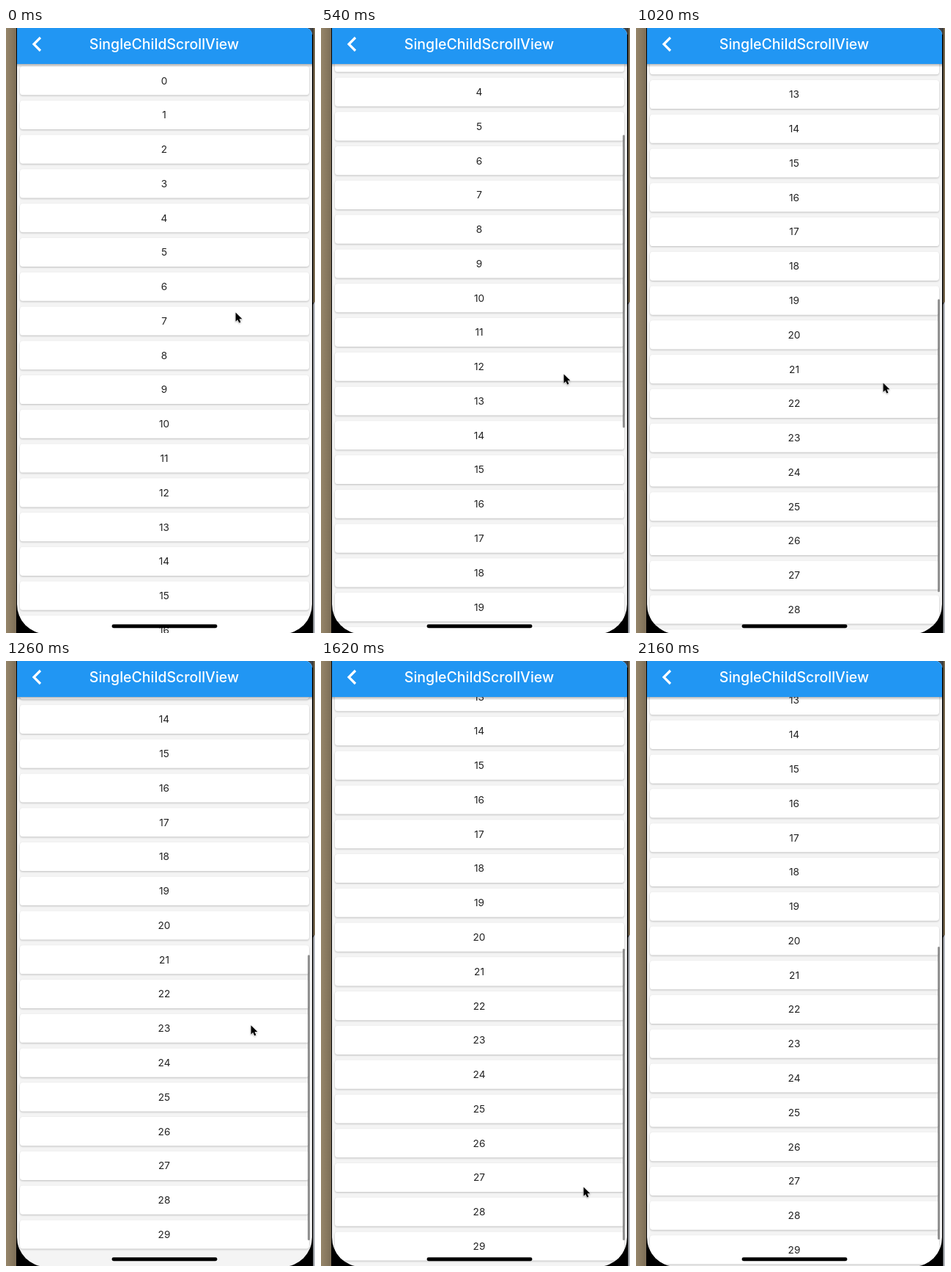
Animation of 422x824 px, one loop 2220 ms. Source, as an HTML page:

```html
<!DOCTYPE html>
<html lang="en">
<head>
<meta charset="utf-8">
<title>Scrolling list</title>
<style>
  html, body { margin: 0; width: 100%; height: 100%; overflow: hidden; background: #000; }
  svg { display: block; width: 422px; height: 824px; }
  text { font-family: Inter, Roboto, sans-serif; text-anchor: middle; }
  .title { font-size: 19.5px; font-weight: 500; fill: #fff; }
  .card rect { fill: #fff; filter: drop-shadow(0 1px .8px rgba(0, 0, 0, .22)); }
  .card text { font-size: 13.7px; fill: #222; }
  #cursor { filter: drop-shadow(0 1px 1px rgba(0, 0, 0, .3)); }
</style>
</head>
<body>
<svg viewBox="0 0 422 824">
  <defs>
    <linearGradient id="wall">
      <stop offset="0" stop-color="#96866a"/>
      <stop offset="1" stop-color="#7d6e57"/>
    </linearGradient>
    <linearGradient id="barShadow" x2="0" y2="1">
      <stop offset="0" stop-opacity=".3"/>
      <stop offset="1" stop-opacity="0"/>
    </linearGradient>
    <clipPath id="screen">
      <path d="M15 0H411Q417 2 418 8V785A40 40 0 0 1 378 825H55A40 40 0 0 1 15 785Z"/>
    </clipPath>
  </defs>

  <rect width="14" height="824" fill="url(#wall)"/>
  <rect x="419.5" width="3" height="374" fill="#78694f"/>
  <path d="M422 373Q419.5 374 419.5 378V824H422Z" fill="#b4b7bd"/>
  <rect x="410" width="9" height="9" fill="#3d4248"/>

  <g clip-path="url(#screen)">
    <rect x="15" width="403" height="825" fill="#f4f4f4"/>
    <g id="list"></g>
    <rect id="thumb" x="412" width="3" rx="1.5" fill="#777" fill-opacity=".8"/>
    <rect x="15" y="48.5" width="403" height="5" fill="url(#barShadow)"/>
    <rect x="15" width="403" height="49" fill="#2196f3"/>
    <path d="M47 13L38 22L47 31" fill="none" stroke="#fff" stroke-width="3.2"/>
    <text class="title" x="216" y="29">SingleChildScrollView</text>
    <rect x="144.5" y="812.3" width="144" height="4.9" rx="2.4"/>
  </g>

  <g id="cursor">
    <path d="M0 0V14.2L3.2 11.2L5.5 16.4L8 15.3L5.8 10.3H10.3Z" transform="translate(.6 .5) scale(.86)"
          stroke="#fff" stroke-linejoin="round" paint-order="stroke"/>
  </g>
</svg>

<script>
const SVG_NS = 'http://www.w3.org/2000/svg';
const LOOP = 2220, STEP = 60;
const ROWS = 30, PITCH = 46.77, FIRST_CENTER = 71.6, CARD_HEIGHT = 39.1;
const TRACK_TOP = 53.5, TRACK_BOTTOM = 789, THUMB_LENGTH = 399, THUMB_RATIO = 0.536;
const FIRST_FLING = 171.6, SCROLL_END = 626, STRETCH = 36.3;

// The pointer eases from one resting point to the next, then leaves the stage.
const pointerStops = [
  { t: 0, x: 313, y: 387 },
  { t: 240, x: 306, y: 359 },
  { t: 540, x: 331, y: 471 },
  { t: 1020, x: 337, y: 483 },
  { t: 1440, x: 332, y: 504 },
  { t: 1620, x: 358, y: 716 },
  { t: 1740, x: 368, y: 845 }
];

const list = document.getElementById('list');
const thumb = document.getElementById('thumb');
const cursor = document.getElementById('cursor');

const progress = (t, from, to) => Math.min(1, Math.max(0, (t - from) / (to - from)));
const mix = (a, b, u) => a + (b - a) * u;
const easeOut = u => 1 - (1 - u) ** 3;
const easeInOut = u => u < 0.5 ? 4 * u ** 3 : 1 - 4 * (1 - u) ** 3;
const smooth = u => u * u * (3 - 2 * u);

function add(parent, tag, attrs) {
  const node = document.createElementNS(SVG_NS, tag);
  for (const key in attrs) node.setAttribute(key, attrs[key]);
  return parent.appendChild(node);
}

for (let i = 0; i < ROWS; i++) {
  const y = FIRST_CENTER + i * PITCH;
  const card = add(list, 'g', { class: 'card' });
  add(card, 'rect', { x: 19, y: y - CARD_HEIGHT / 2, width: 395, height: CARD_HEIGHT, rx: 3.9 });
  add(card, 'text', { x: 216, y: y + 4.9 }).textContent = i;
}

// Two flings reach the end; a third pull stretches past it and springs back.
function scrollAt(t) {
  const first = FIRST_FLING * easeOut(progress(t, 0, 540));
  const second = (SCROLL_END - FIRST_FLING) * easeInOut(progress(t, 540, 1200));
  const release = Math.exp(-Math.max(0, t - 1440) / 90);
  return first + second + STRETCH * easeOut(progress(t, 1200, 1440)) * release;
}

function pointerAt(t) {
  const next = pointerStops.find(stop => stop.t > t) || pointerStops.at(-1);
  const prev = pointerStops[pointerStops.indexOf(next) - 1];
  const u = smooth(progress(t, prev.t, next.t));
  return { x: mix(prev.x, next.x, u), y: mix(prev.y, next.y, u) };
}

function render(t) {
  const scroll = scrollAt(t);
  list.setAttribute('transform', `translate(0 ${-scroll})`);

  const top = TRACK_TOP + scroll * THUMB_RATIO;
  thumb.setAttribute('y', top);
  thumb.setAttribute('height', Math.min(THUMB_LENGTH, TRACK_BOTTOM - top));
  thumb.setAttribute('opacity', progress(t, 0, 180));

  const { x, y } = pointerAt(t);
  cursor.setAttribute('transform', `translate(${x} ${y})`);
}

const start = performance.now();
function tick() {
  const t = (performance.now() - start) % LOOP;
  render(Math.floor(t / STEP) * STEP);
  requestAnimationFrame(tick);
}
tick();
</script>
</body>
</html>
```
